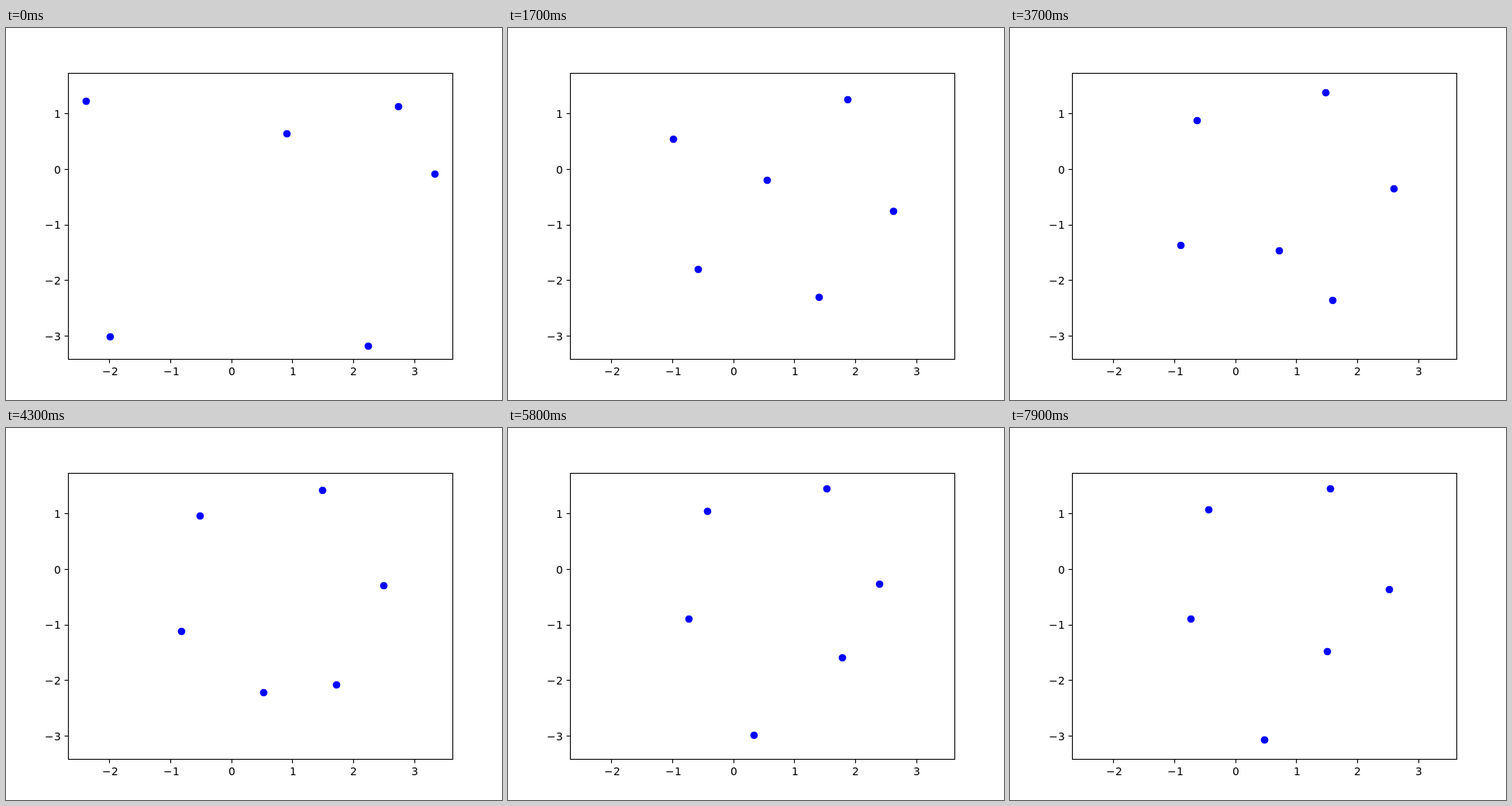
Animation of 640 by 480 pixels, one loop 8 s. Source, as an HTML page:

```html
<!DOCTYPE html>
<html lang="en">
<head>
<meta charset="utf-8">
<title>Six drifting points</title>
<style>
  html, body { margin: 0; width: 100%; height: 100%; overflow: hidden; background: #fff; }
  svg { display: block; width: 640px; height: 480px; }
  text { font: 13.89px "DejaVu Sans", sans-serif; fill: #000; }
  .axis { fill: none; stroke: #000; stroke-width: 1.11; }
  .dot { fill: #00f; }
</style>
</head>
<body>
<svg id="stage" viewBox="0 0 640 480"></svg>
<script>
const LOOP = 8000, STEP = 100, DECAY = 200;
const stage = document.getElementById('stage');

// Each dot is released, gathers, opens the ring, completes it and drifts on.
const stops = [0, 900, 3700, 5000, 7900];
const routes = [
  [[103, 94], [208, 147], [241, 119], [257, 108], [256, 105]],
  [[362, 136], [331, 184], [347, 287], [314, 391], [328, 402]],
  [[506, 101], [446, 93], [407, 83], [410, 78], [413, 78]],
  [[553, 188], [497, 242], [495, 207], [477, 200], [489, 208]],
  [[134, 398], [251, 315], [220, 280], [233, 246], [233, 246]],
  [[467, 410], [399, 346], [416, 351], [436, 303], [409, 288]]
];

function add(name, attrs, content = '') {
  const el = document.createElementNS('http://www.w3.org/2000/svg', name);
  for (const key in attrs) el.setAttribute(key, attrs[key]);
  el.textContent = content;
  return stage.appendChild(el);
}

// Digit and minus sign both start on whole pixels.
function addLabel(n, x, y) {
  add('text', { x, y }, Math.abs(n));
  if (n < 0) add('text', { x: x - 12, y }, '\u2212');
}

function drawAxes() {
  for (let n = -2; n <= 3; n++) {
    const x = 291.1 + 78.65 * n;
    add('path', { class: 'axis', d: `M${Math.floor(x) + 0.5} 427.5v5` });
    addLabel(n, Math.ceil(x + (n < 0 ? 1.76 : -4.42)), 448);
  }
  for (let n = -3; n <= 1; n++) {
    const y = 182.3 - 71.75 * n;
    add('path', { class: 'axis', d: `M80.5 ${Math.floor(y) + 0.5}h-5` });
    addLabel(n, 62, Math.round(y + 5.28));
  }
  add('rect', { class: 'axis', x: 80.5, y: 58.5, width: 496, height: 369 });
}

// Harmonic mean of the neighbouring speeds; at rest where the dot turns back.
function speedAt(route, axis, i) {
  if (i < 2 || i === stops.length - 1) return 0;
  const slope = k => (route[k + 1][axis] - route[k][axis]) / (stops[k + 1] - stops[k]);
  const before = slope(i - 1), after = slope(i);
  return before * after > 0 ? 2 * before * after / (before + after) : 0;
}

function valueAt(route, axis, t) {
  const i = Math.max(0, stops.findLastIndex(s => s <= t && s < stops.at(-1)));
  const from = route[i][axis], to = route[i + 1][axis];
  if (i === 0) {
    const rest = Math.exp(-stops[1] / DECAY);
    return to + (from - to) * (Math.exp(-t / DECAY) - rest) / (1 - rest);
  }
  const span = stops[i + 1] - stops[i];
  const u = (t - stops[i]) / span, w = 1 - u;
  return w * w * ((1 + 2 * u) * from + u * span * speedAt(route, axis, i))
       + u * u * ((1 + 2 * w) * to - w * span * speedAt(route, axis, i + 1));
}

drawAxes();
const dots = routes.map(() => add('circle', { class: 'dot', r: 4.86 }));

function render(ms) {
  const t = Math.floor((ms % LOOP) / STEP) * STEP;
  routes.forEach((route, i) => {
    ['cx', 'cy'].forEach((attr, axis) =>
      dots[i].setAttribute(attr, Math.round(valueAt(route, axis, t)) + 0.5));
  });
}

const start = performance.now();
function tick() {
  render(performance.now() - start);
  requestAnimationFrame(tick);
}
tick();
</script>
</body>
</html>
```
